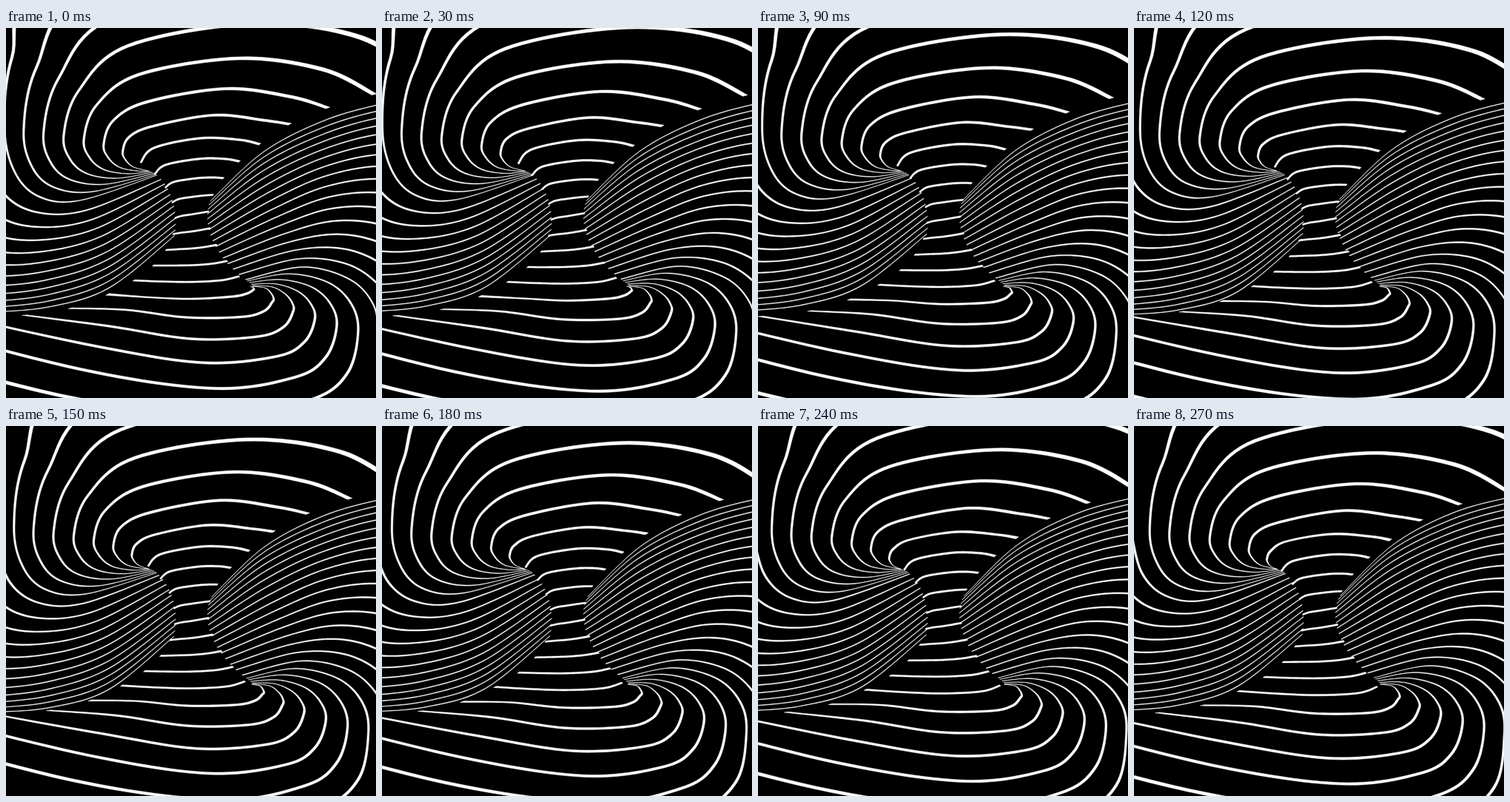
These frames come from a looping animation (500 by 500 pixels, 0.3 s). An HTML page with a canvas:

```html
<!DOCTYPE html>
<html>
<head>
<meta charset="utf-8">
<style>
  html, body { margin: 0; height: 100%; overflow: hidden; background: #000; }
  canvas { display: block; }
</style>
</head>
<body>
<canvas id="stage" width="500" height="500"></canvas>
<script>
const ctx = document.getElementById('stage').getContext('2d');
const LOOP = 300, STEPS = 10, THICKNESS = 0.095;

// Each sheet: contour levels drawn, and x,y points of a few key contours.
const sheets = [
  { // upper funnel, far side
    from: -15.6, to: -4, keys: {
      '-4': [204,199, 100,233, 45,228, 12,195, -2,135],
      '-8': [222,225, 130,281, 50,302, -20,300, -80,270],
      '-12': [229,257, 140,322, 60,350, -20,360, -100,360],
      '-16': [226,288, 140,360, 60,384, -20,389, -100,385] } },
  { // upper funnel, loops
    from: -4, to: 3, keys: {
      '-4': [204,199, 100,233, 45,228, 12,195, -2,135, 8,40, 60,-70, 420,-190, 700,-160, 870,30],
      '-1': [198,195, 150,203, 110,197, 87,178, 78,145, 98,85, 165,24, 335,-6, 480,13, 572,74],
      '1': [193,193, 176,193, 153,188, 138,175, 132,157, 145,125, 190,100, 297,82, 385,93, 435,108],
      '3': [193,193, 189,192, 185,189, 183,186, 182,181, 187,171, 207,158, 265,149, 318,152, 343,157] } },
  { // neck
    from: 3, to: 12, keys: {
      '3': [182,182, 200,162, 262,149, 315,151, 343,157],
      '5': [215,216, 227,208, 258,203, 280,202, 294,203],
      '7': [228,257, 237,254, 250,252, 262,250, 274,248],
      '9': [216,300, 232,299, 250,298, 268,296, 285,293],
      '12': [137,360, 195,364, 250,366, 305,363, 330,354] } },
  { // lower funnel, loops
    from: 12, to: 18, keys: {
      '12': [330,349, 333,350, 334,351, 335,352, 334,354, 325,359, 305,363, 250,366, 195,364, 137,360],
      '14': [333,348, 360,350, 378,360, 387,372, 388,383, 375,404, 340,417, 250,420, 140,403, 25,388],
      '16': [329,344, 372,340, 413,350, 438,372, 447,402, 432,445, 390,472, 280,487, 100,461, -150,396],
      '18': [324,340, 402,323, 465,340, 497,375, 503,418, 490,490, 430,535, 300,562, 30,535, -420,420] } },
  { // lower funnel, far side
    from: 18, to: 34, keys: {
      '18': [324,340, 402,323, 465,340, 497,375, 503,418],
      '23': [288,303, 370,267, 440,244, 510,244, 580,270],
      '28': [273,265, 350,213, 430,175, 510,156, 590,160],
      '34': [279,229, 350,160, 430,117, 510,95, 590,80] } }
];

// Polynomial blend of the key contours at any level.
function contourPoints(keys, level) {
  const levels = Object.keys(keys).map(Number);
  const weights = levels.map(a =>
    levels.reduce((w, b) => a === b ? w : w * (level - b) / (a - b), 1));
  return keys[levels[0]].map((_, i) =>
    levels.reduce((sum, a, k) => sum + weights[k] * keys[a][i], 0));
}

// Catmull-Rom spline through flat x,y points, sampled as [x, y] pairs.
function smooth(flat, detail = 12) {
  const last = flat.length / 2 - 1, out = [];
  const at = (i, axis) => flat[2 * Math.max(0, Math.min(last, i)) + axis];
  const spline = (i, u, axis) => {
    const a = at(i - 1, axis), b = at(i, axis), c = at(i + 1, axis), d = at(i + 2, axis);
    return b + u / 2 * (c - a + u * (2 * a - 5 * b + 4 * c - d + u * (3 * (b - c) + d - a)));
  };
  for (let i = 0; i < last; i++)
    for (let k = 0; k < detail; k++)
      out.push([spline(i, k / detail, 0), spline(i, k / detail, 1)]);
  out.push([at(last, 0), at(last, 1)]);
  return out;
}

// A line is the band between two nearby levels, so it thins with perspective.
function drawLine(keys, level) {
  const edge = side => smooth(contourPoints(keys, level + side * THICKNESS / 2));
  ctx.beginPath();
  for (const [x, y] of [...edge(-1), ...edge(1).reverse()]) ctx.lineTo(x, y);
  ctx.closePath();
  ctx.fill();
  ctx.stroke();
}

function draw(now) {
  const phase = Math.floor(now % LOOP / LOOP * STEPS) / STEPS;
  ctx.fillStyle = '#000';
  ctx.fillRect(0, 0, 500, 500);
  ctx.fillStyle = ctx.strokeStyle = '#fff';
  ctx.lineWidth = 0.5;
  ctx.lineJoin = 'round';
  for (const { from, to, keys } of sheets)
    for (let level = Math.ceil(from - phase) + phase; level < to; level++)
      drawLine(keys, level);
}

const start = performance.now();
function tick() {
  draw(performance.now() - start);
  requestAnimationFrame(tick);
}
tick();
</script>
</body>
</html>
```
